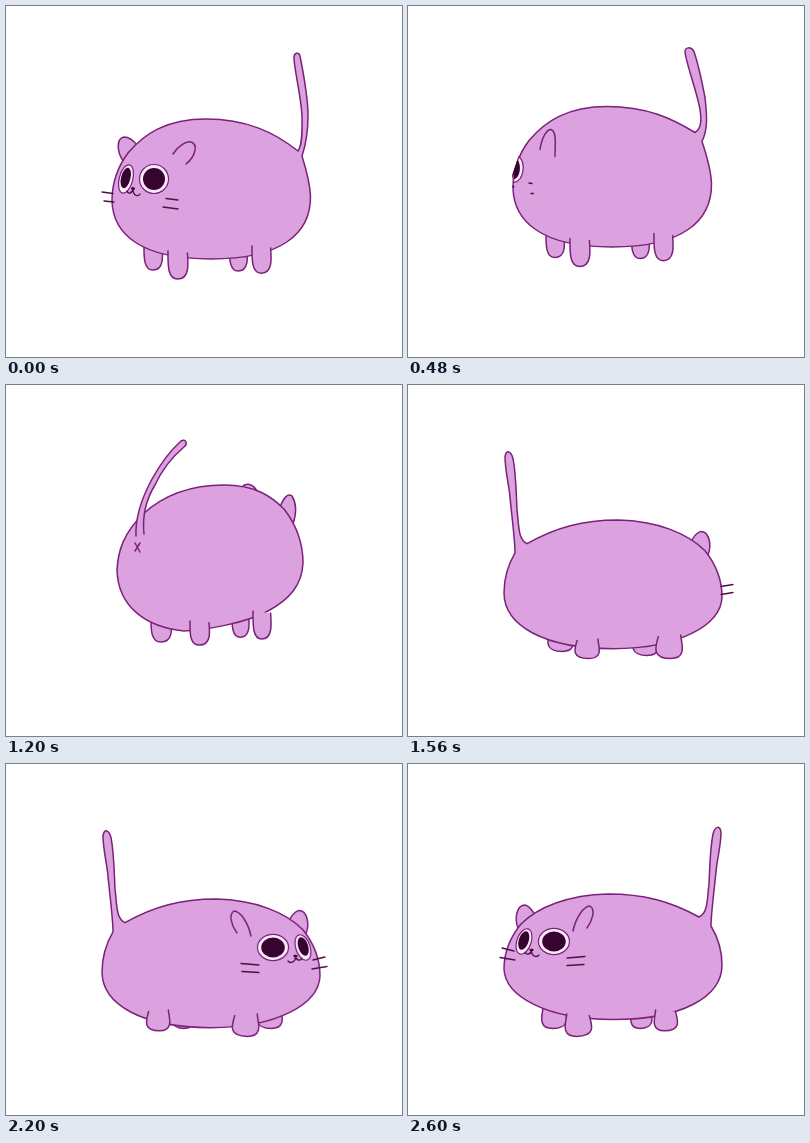
These frames come from a looping animation (396x351 px, 2.64 s). An HTML page without scripts:

```html
<!DOCTYPE html>
<html lang="en">
<head>
<meta charset="utf-8">
<title>Hopping cat</title>
<style>
html, body { margin: 0; width: 100%; height: 100%; overflow: hidden; background: #fff; }
svg { display: block; width: 100vw; height: 100vh; overflow: hidden; }
path, ellipse { vector-effect: non-scaling-stroke; }
.ink { fill: #dba2df; stroke: #7b2179; stroke-width: 1.5; stroke-linecap: round; stroke-linejoin: round; }
.line { fill: none; }
.white { fill: #fbeafb; stroke-width: 1.2; }
.pupil { fill: #37042f; stroke: none; }
.thin { fill: none; stroke: #4f0d4c; stroke-width: 1.3; }
/* one cell per pose, 396 units apart */
#strip { animation: hop 2640ms step-end infinite; }
@keyframes hop {
  0% { transform: translateX(0); }
  7.575% { transform: translateX(-396px); }
  10.606% { transform: translateX(-792px); }
  13.636% { transform: translateX(-1188px); }
  15.151% { transform: translateX(-1584px); }
  18.181% { transform: translateX(-1980px); }
  21.212% { transform: translateX(-2376px); }
  24.242% { transform: translateX(-2772px); }
  31.818% { transform: translateX(-3168px); }
  34.848% { transform: translateX(-3564px); }
  37.878% { transform: translateX(-3960px); }
  40.909% { transform: translateX(-4356px); }
  42.424% { transform: translateX(-4752px); }
  45.454% { transform: translateX(-5148px); }
  48.484% { transform: translateX(-5544px); }
  51.515% { transform: translateX(-5940px); }
  59.09% { transform: translateX(-6336px); }
  62.121% { transform: translateX(-6732px); }
  65.151% { transform: translateX(-7128px); }
  66.666% { transform: translateX(-7524px); }
  69.696% { transform: translateX(-7920px); }
  72.727% { transform: translateX(-8316px); }
  75.757% { transform: translateX(-8712px); }
  83.333% { transform: translateX(-9108px); }
  86.363% { transform: translateX(-9504px); }
  89.393% { transform: translateX(-9900px); }
  90.909% { transform: translateX(-10296px); }
  93.939% { transform: translateX(-10692px); }
  96.969% { transform: translateX(-11088px); }
  98.484%, 100% { transform: translateX(-11484px); }
}
</style>
</head>
<body>
<svg viewBox="0 0 396 351" preserveAspectRatio="none">
<defs>
  <path id="leg" d="M0,0 C0,12 -1,28 10,28 C22,28 21,14 20,2"/>
  <path id="legLow" d="M1,0 C1,8 -5,28 9,28 C25,28 21,13 19,2"/>

  <!-- bodies with tail -->
  <path id="body" d="M292,145 C268,126 240,113 200,113 C160,113 138,128 122,147 C110,163 106,180 106,195 C107,227 133,253 205,253 C275,253 305,228 304.500,190 C304,176 300,163 296,150 C300,138 302,125 302,110 C302,95 297,65 294,50 C293,46 288,46 288,52 C288,62 295,90 296,110 C296,122 297,138 292,145"/>
  <path id="bodyAir" d="M288,139 C265,125 240,113 200,113 C160,113 138,128 122,147 C110,163 106,180 106,195 C107,227 133,253.500 205,253.500 C275,253.500 305,228 304.500,190 C304,176 300,163 295,148 C301,136 300,122 298,104 C295,88 291,70 287,58 C284,53 278,53 278,59 C280,72 287,90 291,107 C295,122 295,135 288,139"/>
  <path id="bodyLow" d="M291,153 C262,137 235,130 200,130 C160,131 130,143 113,160 C100,176 96,192 96,205 C97,232 138,255.500 205,255.500 C274,255.500 314,233 314,201 C314,185 309,172 303,162 C303,150 306,128 308,108 C309,95 313,82 313,68 C312,61 307,62 305,70 C302,85 302,100 301,120 C299,136 300,149 291,153"/>

  <!-- ears and whiskers -->
  <path id="ear" d="M117,155 C110,144 111,132 118,131 C123,131 128,135 132,140"/>
  <path id="earAir" d="M116,152 C112,140 113,129 119,128 C125,128 129,134 130,142"/>
  <path id="earLow" d="M110,164 C106,154 109,141 117,141 C122,142 125,147 128,153"/>
  <path id="ear2" class="line" d="M167,148 C172,140 180,135 185,136 C192,138 190,150 180,158"/>
  <path id="ear2Air" class="line" d="M175,142 C176,134 182,128 187,129 C193,132 192,146 186,154"/>
  <path id="ear2Low" class="line" d="M165,167 C168,153 176,142 182,142 C188,146 184,157 179,164"/>
  <path id="wh" class="thin" d="M96,186 L107,187.500 M98,195 L108,196"/>
  <path id="whLow" class="thin" d="M83,193 L95,196 M81,202.500 L96,205"/>
  <path id="cheek" class="thin" d="M160,192.500 L172,194 M157,201 L172,203"/>
  <path id="cheekUp" class="thin" d="M159,196 L177,194.500 M159,203.500 L176,202.500"/>

  <g id="eye">
    <ellipse class="white" rx="14.500" ry="14.500"/>
    <ellipse class="pupil" rx="11" ry="11"/>
  </g>
  <g id="mouth">
    <ellipse class="pupil" cx="127" cy="182.500" rx="2" ry="1.500"/>
    <path class="thin" d="M121,185 C122,188 126,188 127,183 C127,190 132,191 134,188"/>
  </g>
  <g id="face">
    <g transform="rotate(14 120 173)">
      <ellipse class="white" cx="120" cy="173" rx="6.800" ry="14.500"/>
      <ellipse class="pupil" cx="119.500" cy="172" rx="4.700" ry="10.500"/>
    </g>
    <use href="#eye" x="148" y="173"/>
    <use href="#mouth"/>
  </g>
  <g id="faceLow"><use href="#face" transform="translate(-12.400 21.800) scale(1.070 .9)"/></g>

  <!-- leg sets: far ones sit behind the body -->
  <g id="farF">
    <use href="#leg" transform="translate(138 238) scale(.9 .93)"/>
    <use href="#leg" transform="translate(223.500 239) scale(.87 .93)"/>
  </g>
  <g id="nearF">
    <use href="#leg" transform="translate(162 245) scale(.97 1)"/>
    <use href="#leg" transform="translate(246 240) scale(.93 .97)"/>
  </g>
  <g id="farFLow">
    <use href="#legLow" transform="translate(134 242) scale(1.180 .8)"/>
    <use href="#legLow" transform="translate(223 242) scale(1 .8)"/>
  </g>
  <g id="nearFLow">
    <use href="#legLow" transform="translate(157.500 250) scale(1.250 .8)"/>
    <use href="#legLow" transform="translate(246.500 246) scale(1.100 .74)"/>
  </g>
  <g id="farB">
    <use href="#leg" transform="translate(164 240) scale(.9 .95)"/>
    <use href="#leg" transform="translate(247 237) scale(.9 .95)"/>
  </g>
  <g id="nearB">
    <use href="#leg" transform="translate(140 242) scale(1 1.060)"/>
    <use href="#leg" transform="translate(220 246) scale(.95)"/>
  </g>
  <g id="farBLow">
    <use href="#legLow" transform="translate(160 248) scale(1.200 .8)"/>
    <use href="#legLow" transform="translate(245 244) scale(1.200 .8)"/>
  </g>
  <g id="nearBLow">
    <use href="#legLow" transform="translate(136 250) scale(1.250 .84)"/>
    <use href="#legLow" transform="translate(219 254) scale(1.150 .7)"/>
  </g>

  <!-- front three-quarter poses -->
  <g id="front">
    <use href="#farF"/><use href="#ear"/><use href="#body"/><use href="#nearF"/>
    <use href="#ear2"/><use href="#face"/><use href="#wh"/><use href="#cheek"/>
  </g>
  <g id="frontAir">
    <use href="#farF"/><use href="#earAir"/><use href="#bodyAir"/><use href="#nearF"/>
    <use href="#ear2Air"/><use href="#face" x="-2" y="3"/><use href="#wh" x="-2" y="-1.500"/>
    <use href="#cheekUp"/>
  </g>
  <g id="frontLow">
    <use href="#farFLow"/><use href="#earLow"/><use href="#bodyLow"/><use href="#nearFLow"/>
    <use href="#ear2Low"/><use href="#faceLow"/><use href="#whLow" x="11" y="-9"/>
    <use href="#cheekUp" y="-2"/>
  </g>
  <g id="frontLand">
    <use href="#farFLow"/><use href="#earLow"/><use href="#bodyLow"/><use href="#nearFLow"/>
    <use href="#ear2" x="-5" y="6"/><use href="#faceLow" x="-10" y="9"/><use href="#whLow"/>
    <use href="#cheekUp" x="-9" y="8"/>
  </g>
  <g id="frontDip">
    <use href="#farFLow"/>
    <g transform="matrix(1 0 0 1.024 0 2)"><use href="#earLow"/><use href="#bodyLow"/></g>
    <use href="#nearFLow"/>
    <use href="#ear2Low" y="5"/><use href="#faceLow" x="-3" y="6"/><use href="#whLow" x="8"/>
    <use href="#cheekUp" x="-2" y="5"/>
  </g>

  <!-- rear three-quarter poses -->
  <g id="rear">
    <use href="#farB"/><use href="#ear"/><use href="#body"/><use href="#nearB"/><use href="#wh"/>
  </g>
  <g id="rearAir">
    <use href="#farB"/><use href="#earAir"/><use href="#bodyAir"/><use href="#nearB"/><use href="#wh"/>
  </g>
  <g id="rearLow">
    <use href="#farBLow"/><use href="#earLow"/><use href="#bodyLow"/><use href="#nearBLow"/>
    <use href="#whLow" x="2" y="2"/>
  </g>
  <g id="rearDip">
    <use href="#farBLow"/>
    <g transform="matrix(1 0 0 1.024 0 2)"><use href="#earLow"/><use href="#bodyLow"/></g>
    <use href="#nearBLow"/>
    <path class="thin" d="M85,199.500 L97,201.500 M85,207.500 L97,209.500"/>
  </g>

  <!-- turning poses -->
  <g id="side">
    <use href="#farF"/><use href="#bodyAir" x="-1"/><use href="#nearF"/>
    <path class="line" d="M132,156 C134,143 139,136 143,136 C149,138 147,152 147,163"/>
    <path class="white" d="M111,163 C118,170 116,187 106,189 L104.500,182 Z"/>
    <path class="pupil" d="M109.500,166 C114,172 112,184 106,186 L105,180 Z"/>
    <path class="thin" d="M121,189.500 L124,190 M123,200 L125.500,200 M104.500,193 L106,193.500"/>
  </g>
  <path id="bulk" d="M137,129 C160,108 190,100 218,100 C250,100 266,112 278,124 C292,142 297,160 297,178 C296,200 284,214 262,226 C240,238 200,245 178,246 C140,242 112,222 111,185 C112,165 118,148 137,129"/>
  <g id="back">
    <use href="#leg" transform="translate(145 231) scale(1 .93)"/>
    <use href="#leg" transform="translate(226 227) scale(.83 .9)"/>
    <path d="M236,102 C240,97 247,99 251,106 M274,122 C278,112 282,108 286,111 C291,119 290,130 287,139"/>
    <use href="#bulk"/>
    <use href="#leg" transform="translate(184 236) scale(.95 .86)"/>
    <use href="#leg" transform="translate(247 226) scale(.88 1)"/>
    <path d="M130,151 C129,130 139,107 146,94 C155,78 166,64 175,56 C180,53 182,59 178,62 C165,73 155,87 149,100 C141,113 136,130 138,149"/>
    <path class="line" d="M129,158 L134,167 M134,158 L129,166"/>
  </g>
  <g id="ahead">
    <path d="M210,125 C212,100 207,80 209,58 C211,53 216,53 217,59 C218,80 219,100 218,125"/>
    <use href="#farF" x="4"/>
    <path d="M134,142 C126,124 138,118 158,124 M276,142 C284,124 272,118 252,124"/>
    <ellipse cx="205" cy="183" rx="96" ry="70"/>
    <use href="#nearF"/>
    <use href="#eye" x="184" y="173"/><use href="#eye" x="224" y="173"/>
    <use href="#mouth" x="77" y="4"/>
    <path class="thin" d="M149,193 L163,194 M148,202 L162,202 M261,193 L247,194 M262,202 L248,202"/>
  </g>
</defs>

<g id="strip" class="ink">
  <use href="#front"/>
  <use href="#frontDip" x="396"/>
  <use href="#front" x="792" y="-10"/>
  <use href="#frontAir" x="1188" y="-27"/>
  <use href="#frontAir" x="1584" y="-24"/>
  <use href="#side" x="1980" y="-12.500"/>
  <use href="#rearLow" x="2376"/>
  <use href="#rear" x="2772"/>
  <use href="#rearDip" x="3168"/>
  <use href="#rear" x="3564" y="-10"/>
  <use href="#rearAir" x="3960" y="-27"/>
  <use href="#back" transform="translate(4766 -14) scale(-1 1)"/>
  <use href="#back" x="4752" y="-10"/>
  <use href="#back" x="5148"/>
  <use href="#rearLow" transform="translate(5954) scale(-1 1)"/>
  <use href="#rear" transform="translate(6350) scale(-1 1)"/>
  <use href="#rearDip" transform="translate(6746) scale(-1 1)"/>
  <use href="#rear" transform="translate(7142 -10) scale(-1 1)"/>
  <use href="#rearAir" transform="translate(7538 -27) scale(-1 1)"/>
  <use href="#side" transform="translate(7934 -24) scale(-1 1)"/>
  <use href="#frontAir" transform="translate(8330 -12) scale(-1 1)"/>
  <use href="#frontLand" transform="translate(8726) scale(-1 1)"/>
  <use href="#front" transform="translate(9122) scale(-1 1)"/>
  <use href="#frontDip" transform="translate(9518) scale(-1 1)"/>
  <use href="#front" transform="translate(9914 -10) scale(-1 1)"/>
  <use href="#frontAir" transform="translate(10310 -22) scale(-1 1)"/>
  <use href="#frontAir" transform="translate(10706 -27) scale(-1 1)"/>
  <use href="#ahead" x="10692" y="-20"/>
  <use href="#frontAir" x="11088" y="-10"/>
  <use href="#frontLow" x="11484"/>
</g>
</svg>
</body>
</html>
```
